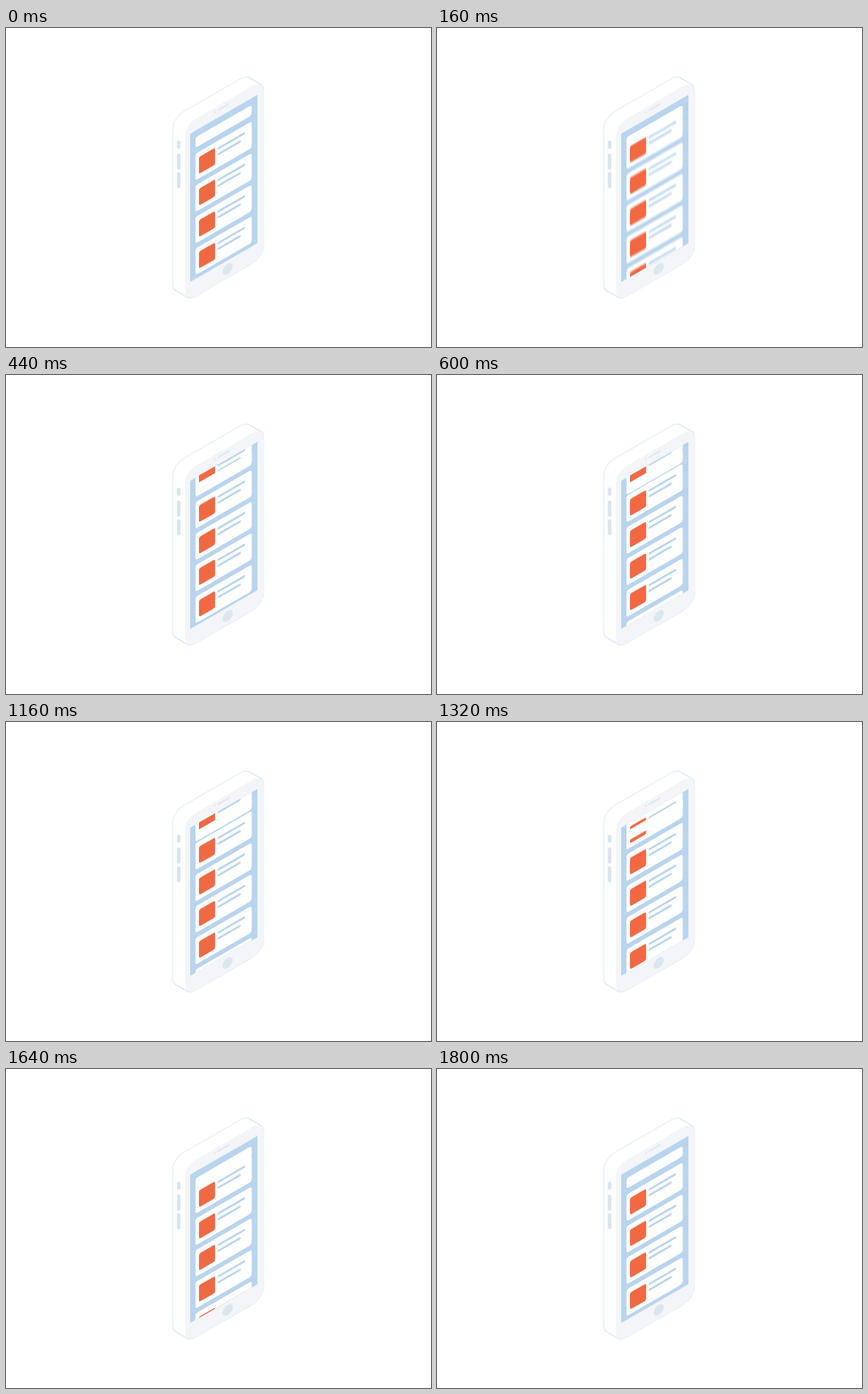
Write an HTML page that moves like this. It is 480 px wide and 360 px high and loops after 2.48 s.

```html
<!DOCTYPE html>
<html lang="en">
<head>
<meta charset="utf-8">
<title>Scrolling phone</title>
<style>
  html, body { margin: 0; width: 100%; height: 100%; overflow: hidden; background: #fff; }
  svg { display: block; width: 480px; height: 360px; }
</style>
</head>
<body>
<svg viewBox="0 0 480 360">
  <defs>
    <clipPath id="screenClip">
      <rect x="208" y="119.3" width="76" height="167.4" transform="matrix(1 -.577 0 1 0 120)"/>
    </clipPath>
    <filter id="motionBlur" filterUnits="userSpaceOnUse" x="0" y="0" width="480" height="360"
            color-interpolation-filters="sRGB">
      <feGaussianBlur id="blur" stdDeviation="0 1"/>
    </filter>
    <!-- Back face, front face and the sweep between their corners -->
    <g id="body">
      <rect x="188.7" y="90.4" width="88.3" height="200" rx="12"/>
      <rect x="202.2" y="106" width="88.3" height="200" rx="12"/>
      <path d="M274.1 94.6 L287.6 110.2 L205.1 301.9 L191.6 286.3Z"/>
    </g>
    <g id="card">
      <rect x="214" y="145.5" width="63.5" height="30" rx="2.5" fill="#fff"/>
      <rect x="218" y="151.5" width="18.2" height="19" rx="2" fill="#f16943"/>
      <g fill="#b9d4ed">
        <rect x="239" y="152.9" width="31" height="2.6" rx="1"/>
        <rect x="239" y="159.4" width="26" height="2.6" rx="1"/>
      </g>
    </g>
  </defs>

  <g transform="matrix(1 -.577 0 1 0 120)">
    <use href="#body" fill="none" stroke="#d8e8f7" stroke-width="1.6"/>
    <use href="#body" fill="#fff"/>
    <rect x="202.2" y="106" width="88.3" height="200" rx="12" fill="#f3f5f8"/>
    <rect x="208" y="119.3" width="76" height="167.4" rx="1" fill="#b9d4ed"/>
    <g fill="#dce6ef">
      <circle cx="250.4" cy="296.4" r="5.7"/>
      <circle cx="236" cy="111" r="1"/>
      <rect x="239" y="110.1" width="13.5" height="1.8" rx=".9"/>
    </g>
  </g>

  <g fill="#dae5ef">
    <rect x="193" y="127" width="4" height="9.5" rx="2"/>
    <rect x="193" y="141.5" width="4" height="18.5" rx="2"/>
    <rect x="193" y="162.5" width="4" height="18.5" rx="2"/>
  </g>

  <g clip-path="url(#screenClip)">
    <g id="blurred">
      <g transform="matrix(1 -.577 0 1 0 120)"><g id="cards"></g></g>
    </g>
    <rect x="214" y="127" width="63.5" height="11.7" rx="2.5" fill="#fff" transform="matrix(1 -.577 0 1 0 120)"/>
  </g>
</svg>
<script>
  const LOOP = 2480, STEP = 40, PITCH = 35.6, DISTANCE = 76.7, CARD_COUNT = 8;
  const byId = id => document.getElementById(id);
  const cards = byId('cards'), blurred = byId('blurred'), blur = byId('blur');

  cards.innerHTML = Array.from({ length: CARD_COUNT },
    (_, i) => `<use href="#card" y="${i * PITCH}"/>`).join('');

  function ease(start, end, time) {
    const p = Math.min(1, Math.max(0, (time - start) / (end - start)));
    return p < .5 ? 2 * p * p : 1 - 2 * (1 - p) ** 2;
  }

  const scrollAt = time => DISTANCE * (ease(0, 560, time) - ease(1120, 1800, time));

  function draw(now) {
    const time = Math.floor(now % LOOP / STEP) * STEP;
    // Half-frame shutter; a box of width w has deviation w / sqrt(12).
    const smear = Math.abs(scrollAt(time + STEP / 4) - scrollAt(time - STEP / 4));
    const deviation = smear / Math.sqrt(12);
    cards.setAttribute('transform', `translate(0 ${-scrollAt(time)})`);
    if (deviation > .15) {
      blur.setAttribute('stdDeviation', `0 ${deviation}`);
      blurred.setAttribute('filter', 'url(#motionBlur)');
    } else {
      blurred.removeAttribute('filter');
    }
  }

  const started = performance.now();
  function tick() {
    draw(performance.now() - started);
    requestAnimationFrame(tick);
  }
  tick();
</script>
</body>
</html>
```
